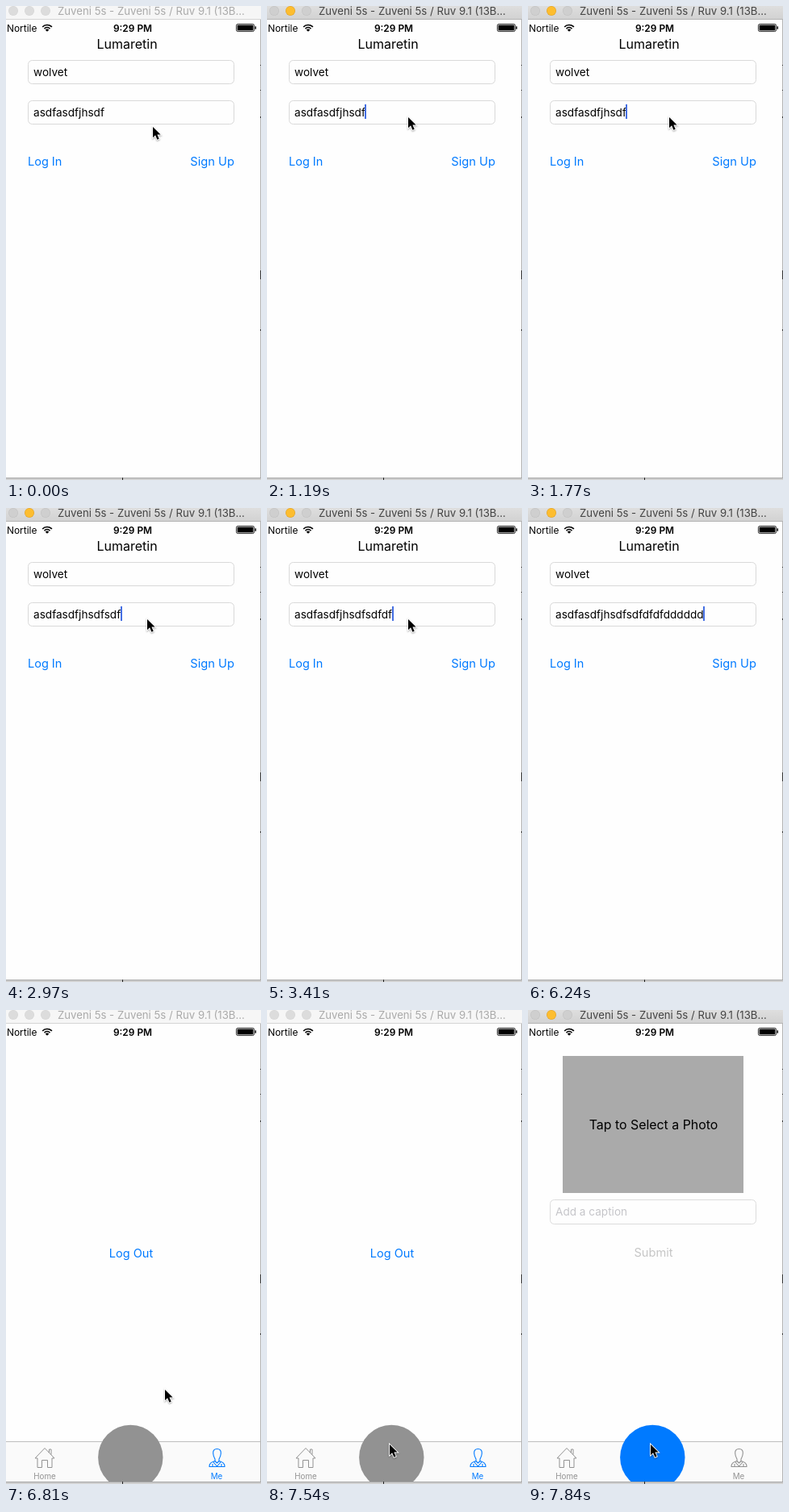
Animation of 316 by 588 pixels, one loop 8 s. Source, as an HTML page with a canvas:

```html
<!DOCTYPE html>
<html lang="en">
<head>
<meta charset="utf-8">
<title>Login demo</title>
<style>
  html, body { margin: 0; width: 100%; height: 100%; overflow: hidden; background: #fff; }
  canvas { display: block; width: 316px; height: 588px; }
</style>
</head>
<body>
<canvas id="stage"></canvas>
<script>
const W = 316, H = 588, LOOP = 8000;
const BLUE = '#007aff', GRAY = '#929292';
const canvas = document.getElementById('stage');
const ctx = canvas.getContext('2d');
const dpr = window.devicePixelRatio || 1;
canvas.width = W * dpr;
canvas.height = H * dpr;
ctx.scale(dpr, dpr);

const PASSWORD = 'asdfasdfjhsdfsdfdfdfdddddd';

// [time, characters shown]
const typing = [[0, 13], [2070, 15], [2220, 16], [3260, 17], [3410, 18], [3710, 19],
  [3850, 20], [4150, 21], [4300, 22], [4600, 23], [4749, 24], [4897, 26]];

// [time, caret opacity]
const blink = [[0, 0], [150, .5], [300, 1], [2820, .4], [2970, 1], [5790, .4], [5940, 0], [6240, 1]];

// [time, x, y]; no position hides the pointer
const pointer = [[0, 181, 149], [150, 177, 142], [300, 174, 137],
  [5046, 196, 154], [5194, 226, 176], [5343, 247, 190], [5640],
  [6810, 196, 470], [6956, 183, 494], [7102, 170, 516], [7248, 158, 531], [7394, 152, 537], [7540, 151, 538]];

const at = (steps, t) => steps.filter(s => s[0] <= t).pop();

function text(str, x, y, size, color = '#000', align = 'left', weight = 400) {
  ctx.font = `${weight} ${size}px Inter, "Liberation Sans", sans-serif`;
  ctx.textAlign = align;
  ctx.fillStyle = color;
  ctx.fillText(str, x, y);
}

function rect(x, y, w, h, color) {
  ctx.fillStyle = color;
  ctx.fillRect(x, y, w, h);
}

function disc(x, y, r, color) {
  ctx.fillStyle = color;
  ctx.beginPath();
  ctx.arc(x, y, r, 0, Math.PI * 2);
  ctx.fill();
}

function stroke(path, color, width = 1) {
  ctx.strokeStyle = color;
  ctx.lineWidth = width;
  ctx.stroke(new Path2D(path));
}

function box(x, y, w, h, color) {
  ctx.beginPath();
  ctx.roundRect(x + .5, y + .5, w - 1, h - 1, 5);
  ctx.strokeStyle = color;
  ctx.lineWidth = 1;
  ctx.stroke();
}

function titleBar(active) {
  const fill = ctx.createLinearGradient(0, 0, 0, 16);
  fill.addColorStop(0, active ? '#dedede' : '#f6f6f6');
  fill.addColorStop(1, active ? '#d2d2d2' : '#f6f6f6');
  rect(0, 0, W, 16, fill);
  rect(0, 16, W, 1, active ? '#b4b4b4' : '#d4d4d4');
  [9, 29, 49].forEach((x, i) => {
    const lit = active && i === 1;
    disc(x, 6, 6, lit ? '#e0a32b' : active ? '#c2c2c2' : '#d6d6d6');
    disc(x, 6, 5.4, lit ? '#fdbd2f' : active ? '#cfcfcf' : '#dcdcdc');
  });
  text('Zuveni 5s - Zuveni 5s / Ruv 9.1 (13B...', 64, 11, 13.2, active ? '#444' : '#aaa');
}

function statusBar() {
  text('Nortile', 1, 31.5, 11.9);
  ctx.lineCap = 'butt';
  ctx.strokeStyle = '#000';
  ctx.lineWidth = 1.7;
  for (const r of [4.8, 8]) {
    ctx.beginPath();
    ctx.arc(51, 31.5, r, -Math.PI * .76, -Math.PI * .24);
    ctx.stroke();
  }
  ctx.fillStyle = '#000';
  ctx.beginPath();
  ctx.moveTo(51, 31.7);
  ctx.arc(51, 31.7, 3, -Math.PI * .76, -Math.PI * .24);
  ctx.fill();
  text('9:29 PM', 157, 31.5, 11.9, '#000', 'center', 600);
  ctx.beginPath();
  ctx.roundRect(285.4, 22.4, 22.2, 9.2, 2);
  ctx.lineWidth = .8;
  ctx.stroke();
  rect(286.6, 23.6, 19.8, 6.8, '#000');
  rect(308.6, 25.3, 1.4, 3.4, '#000');
}

function edges() {
  rect(315, 17, 1, 569, '#b5b5b5');
  for (const [y, h] of [[73, 1], [104, 1], [137, 2], [328, 11], [401, 2]]) rect(315, y, 1, h, '#333');
  rect(0, 585, W, 1, '#a6a6a6');
  rect(0, 586, W, 2, '#cfcfcf');
  rect(144, 585, 1, 3, '#222');
}

function loginPage(t) {
  text('Lumaretin', 150, 53, 16, '#000', 'center');
  box(27, 67, 256, 30, '#d9d9d9');
  box(27, 117, 256, 30, '#d9d9d9');
  text('wolvet', 34, 86.5, 13.6);
  const typed = PASSWORD.slice(0, at(typing, t)[1]);
  text(typed, 34, 136.5, 13.6);
  ctx.globalAlpha = at(blink, t)[1];
  rect(Math.round(33.5 + ctx.measureText(typed).width), 122, 2, 18, '#456fe3');
  ctx.globalAlpha = 1;
  text('Log In', 27, 197.5, 14.5, BLUE);
  text('Sign Up', 283, 197.5, 14.7, BLUE, 'right');
}

function mePage() {
  text('Log Out', 155, 306.5, 14.5, BLUE, 'center');
}

function photoPage() {
  rect(43, 57, 224, 170, '#aaa');
  text('Tap to Select a Photo', 155.5, 148, 15.9, '#000', 'center');
  box(27, 235, 256, 31, '#dcdcdc');
  text('Add a caption', 34, 255, 13.6, '#c5c5c9');
  text('Submit', 155.5, 306, 14.6, '#c6c6c6', 'center');
}

function tabBar(photo) {
  rect(0, 535, 315, 50, '#fafafa');
  rect(0, 535, 315, 1, '#bdbdbd');
  ctx.lineJoin = 'round';
  stroke('M36 556L48 543.5L60 556H57V567.5H51.5V558.5H44.5V567.5H39V556ZM53.5 549V545H56V551.5', GRAY);
  text('Home', 48, 581.5, 9.8, GRAY, 'center');

  const tint = photo ? GRAY : BLUE;
  stroke('M261.5 544.5C257.5 544.5 256.5 547 256.7 550C256.9 554 258.5 556 259 557V559.5' +
    'C256 561 252 561 252 566.5H271C271 561 267 561 264 559.5V557' +
    'C264.5 556 266.1 554 266.3 550C266.5 547 265.5 544.5 261.5 544.5Z' +
    'M257 561L261.5 566L266 561M259 559.5L261.5 562L264 559.5M256 563V566M267 563V566', tint, 1.1);
  text('Me', 261, 581.5, 9.8, tint, 'center');

  ctx.save();
  ctx.beginPath();
  ctx.rect(0, 500, 315, 85);
  ctx.clip();
  disc(154.3, 555, 40.2, photo ? BLUE : GRAY);
  ctx.restore();
}

function arrow(x, y) {
  const shape = new Path2D('M1 1V14.2L4.1 11.3L6.4 16.7L8.7 15.7L6.4 10.5H10.6Z');
  ctx.save();
  ctx.translate(x, y);
  ctx.lineJoin = 'miter';
  ctx.shadowColor = 'rgba(0,0,0,.35)';
  ctx.shadowBlur = 2 * dpr;
  ctx.shadowOffsetY = dpr;
  ctx.strokeStyle = '#fff';
  ctx.lineWidth = 1.8;
  ctx.stroke(shape);
  ctx.shadowColor = 'transparent';
  ctx.fillStyle = '#000';
  ctx.fill(shape);
  ctx.restore();
}

function draw(t) {
  const loggedIn = t >= 6810, photo = t >= 7840;
  rect(0, 0, W, H, '#fefefe');
  titleBar(photo || (t >= 740 && !loggedIn));
  statusBar();
  if (photo) photoPage();
  else if (loggedIn) mePage();
  else loginPage(t);
  if (loggedIn) tabBar(photo);
  edges();
  const [, x, y] = at(pointer, t);
  if (x !== undefined) arrow(x, y);
}

const start = performance.now();
function tick() {
  draw((performance.now() - start) % LOOP);
  requestAnimationFrame(tick);
}
tick();
</script>
</body>
</html>
```
